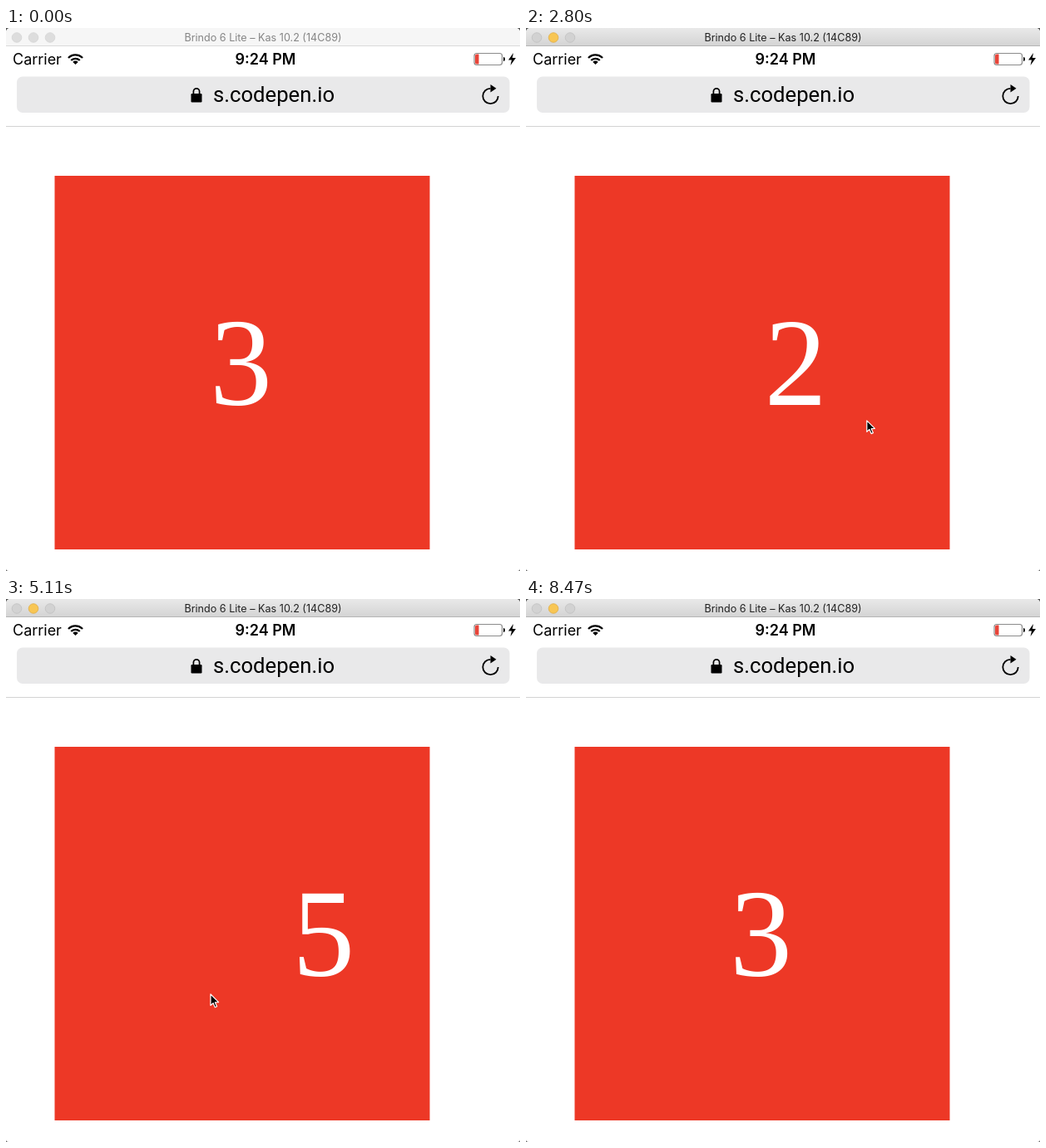
Recreate the animation shown at these times as an HTML page with a canvas. Size 618 by 654 pixels, loop 8.54 s.

```html
<!DOCTYPE html>
<html lang="en">
<head>
<meta charset="utf-8">
<title>Swipe slider</title>
<style>
  html, body { margin: 0; width: 100%; height: 100%; overflow: hidden; background: #fff; }
  canvas { display: block; }
</style>
</head>
<body>
<canvas id="stage" width="618" height="654"></canvas>
<script>
const ctx = document.getElementById('stage').getContext('2d');
const LOOP = 8540, STEP = 70;
const SLIDE = 450, DRAG = 160, DRAG_TIME = 210, GLIDE = 140, REACH_TIME = 200;
const ENTER = 280, ACTIVATE = 770, LEAVE = 7770;
const SANS = 'Inter, Roboto, sans-serif';

// One drag each: start time, change of slide, where the pointer lets go
const swipe = (start, dir, x, y) => ({ start, dir, x, y });
const swipes = [
  swipe(800, -1, 385, 510), swipe(1660, -1, 488, 502),
  swipe(2320, 1, 347, 467), swipe(2880, 1, 290, 475),
  swipe(3302, 1, 256, 471), swipe(4750, 1, 245, 475),
  swipe(5413, -1, 405, 475), swipe(6150, -1, 441, 465)
];

const clamp = u => Math.min(1, Math.max(0, u));
const mix = (a, b, u) => a + (b - a) * u;
const travel = dt => DRAG * clamp(dt / DRAG_TIME) ** 2;

// The slide follows the drag, then glides to rest
function shift(dt) {
  const rest = SLIDE - DRAG;
  return travel(dt) + (dt > DRAG_TIME ? rest * (1 - Math.exp((DRAG_TIME - dt) / GLIDE)) : 0);
}

function position(t) {
  return swipes.reduce((n, s) => n + s.dir * shift(t - s.start) / SLIDE, 3);
}

// The pointer reaches for the grab point, drags and waits where it lets go
function pointerAt(t) {
  let x = 300, y = 624;
  for (const s of swipes) {
    const u = clamp((t - s.start) / REACH_TIME + 1);
    x = mix(x, s.x + s.dir * DRAG, u) - s.dir * travel(t - s.start);
    y = mix(y, s.y, u);
  }
  const exit = Math.max(0, t - LEAVE) / 280;
  return [x + 84 * exit, y + 147 * exit];
}

function box(x, y, w, h, r, color) {
  ctx.beginPath();
  ctx.roundRect(x, y, w, h, r);
  if (color) fill(color);
}

function fill(color) {
  ctx.fillStyle = color;
  ctx.fill();
}

function stroke(color, width) {
  ctx.strokeStyle = color;
  ctx.lineWidth = width;
  ctx.stroke();
}

function poly(points, color) {
  ctx.beginPath();
  points.forEach(([x, y]) => ctx.lineTo(x, y));
  ctx.closePath();
  fill(color);
}

function arc(x, y, r, from = 0, to = 2 * Math.PI) {
  ctx.beginPath();
  ctx.arc(x, y, r, from, to);
}

function text(str, x, y, font, color, align = 'left') {
  ctx.font = font;
  ctx.fillStyle = color;
  ctx.textAlign = align;
  ctx.fillText(str, x, y);
}

function titleBar(active) {
  const shade = ctx.createLinearGradient(0, 0, 0, 22);
  shade.addColorStop(0, active ? '#e9e9e9' : '#f6f6f6');
  shade.addColorStop(1, active ? '#d3d3d3' : '#f6f6f6');
  box(0, 0, 618, 22, 0, shade);
  box(0, 21, 618, 1, 0, active ? '#b5b5b5' : '#dadada');
  for (let i = 0; i < 3; i++) {
    const lit = active && i === 1;
    arc(13 + 20 * i, 11.5, 5.8);
    fill(lit ? '#f8c654' : active ? '#d2d2d2' : '#dddddd');
    stroke(lit ? '#dfab42' : active ? '#bfbfbf' : '#d3d3d3', 0.8);
  }
  text('Brindo 6 Lite – Kas 10.2 (14C89)', 309, 16, '12.6px ' + SANS,
    active ? '#222' : '#858585', 'center');
}

function wifi(x, y) {
  const half = 0.26 * Math.PI, up = -Math.PI / 2;
  ctx.beginPath();
  ctx.moveTo(x, y);
  ctx.arc(x, y, 4.4, up - half, up + half);
  fill('#000');
  for (const r of [7.2, 11.7]) {
    arc(x, y, r, up - half, up + half);
    stroke('#000', 2.3);
  }
}

function statusBar() {
  text('Carrier', 8, 44, '18px ' + SANS, '#000');
  text('9:24 PM', 312, 44, '600 18px ' + SANS, '#000', 'center');
  wifi(83.5, 44);
  box(563, 30.5, 33.5, 14, 3);
  stroke('#8b8b8b', 1.2);
  box(564, 31.5, 4.5, 12, [2, 0, 0, 2], '#e8453a');
  box(598, 35, 2, 5, [0, 2, 2, 0], '#111');
  poly([[610, 30], [604, 38.5], [608, 38.5], [606.5, 45], [613, 36], [608.8, 36]], '#000');
}

function addressBar() {
  box(13, 58.5, 592.5, 43.5, 7, '#e9e9ea');
  box(0, 118, 618, 1, 0, '#d3d3d3');

  box(222.5, 79, 13, 10.5, 1.2, '#000');
  ctx.beginPath();
  ctx.moveTo(225.4, 80);
  ctx.arc(229, 76.5, 3.6, Math.PI, 0);
  ctx.lineTo(232.6, 80);
  stroke('#000', 1.7);
  text('s.codepen.io', 322, 89, '25.7px Roboto, sans-serif', '#000', 'center');

  arc(582.5, 82, 9.2, 0, 1.5 * Math.PI);
  stroke('#000', 1.8);
  poly([[582.5, 68], [589.5, 72.7], [582.5, 77.4]], '#000');
}

function slider(pos) {
  ctx.save();
  box(58.5, 178, SLIDE + 1, SLIDE, 0, '#ed3826');
  ctx.clip();
  for (let n = 1; n <= 5; n++) {
    text(n, 245 + (n - pos) * SLIDE, 453.5, '150px "Liberation Serif", serif', '#fff');
  }
  ctx.restore();
}

function cursor([x, y]) {
  ctx.save();
  ctx.translate(x + 1, y + 1);
  poly([[0, 0], [0, 13.5], [3.1, 10.7], [5.3, 15.8], [7.6, 14.8], [5.4, 9.9], [9.6, 9.6]], '#000');
  ctx.lineJoin = 'round';
  stroke('#fff', 1.2);
  ctx.restore();
}

function draw(t) {
  box(0, 0, 618, 654, 0, '#555');
  ctx.save();
  box(0, 0, 618, 654, [5, 5, 3, 3], '#fff');
  ctx.clip();
  titleBar(t >= ACTIVATE);
  statusBar();
  addressBar();
  slider(position(t));
  if (t >= ENTER) cursor(pointerAt(t));
  ctx.restore();
}

const begin = performance.now();
function tick(now) {
  const t = Math.max(0, now - begin) % LOOP;
  draw(Math.floor(t / STEP) * STEP);
  requestAnimationFrame(tick);
}
draw(0);
requestAnimationFrame(tick);
</script>
</body>
</html>
```
